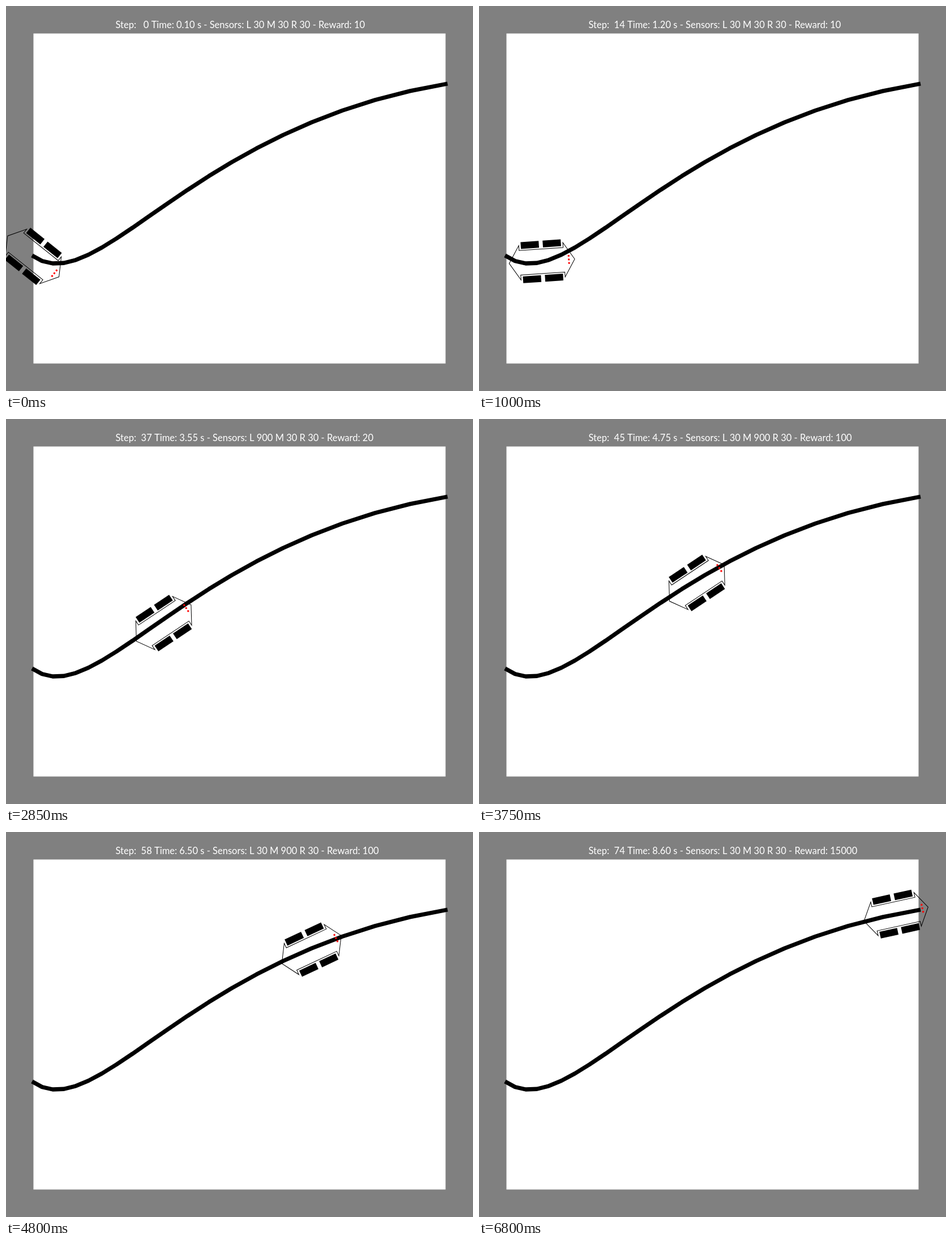
Recreate the animation shown at these times as an HTML page with a canvas. Size 825 by 679 pixels, loop 6950 ms.

```html
<!DOCTYPE html>
<html lang="en">
<head>
<meta charset="utf-8">
<title>Line follower</title>
<style>
  html, body { margin: 0; width: 100%; height: 100%; overflow: hidden; background: #808080; }
  canvas { display: block; }
</style>
</head>
<body>
<canvas id="stage" width="825" height="679"></canvas>
<script>
const ctx = document.getElementById('stage').getContext('2d');

const LOOP = 6950;      // ms
const TICK = 50;        // steps start on whole ticks
const FORWARD = 15.95;  // px per forward move
const TURN = 4.25;      // degrees per turn on the spot
const REACH = 47.6;     // sensor row ahead of the car centre
const GAP = 6.3;        // spacing of the sensors
const MARGIN = 48.5;
const WIDTH = 825, HEIGHT = 679;

// Each leg: turns (negative is left), then forward moves
const LEGS = [
  [-6, 1], [-1, 2], [-2, 1], [-3, 1], [-3, 3], [-3, 2], [2, 6],
  [-1, 10], [1, 3], [1, 8], [1, 3], [1, 4], [1, 4]
];

// Pace of the playback: step, ms
const PACE = [
  [0, 0], [1, 100], [14, 1000], [16, 1100], [17, 1250], [26, 2000], [28, 2300],
  [37, 2850], [41, 3450], [45, 3750], [54, 4400], [58, 4800], [64, 5500], [75, LOOP]
];

const clamp = (v, lo, hi) => Math.min(hi, Math.max(lo, v));

// The line is a cubic curve in 20 straight pieces
function bezier(t, a, b, c, d) {
  const s = 1 - t;
  return s * s * s * a + 3 * s * s * t * b + 3 * s * t * t * c + t * t * t * d;
}
const track = Array.from({ length: 21 }, (_, i) => [
  bezier(i / 20, 46, 162.3, 324.5, 780),
  bezier(i / 20, 440, 524.3, 211.2, 137)
]);

const side = [[58, 0], [39, 30.5], [39, 21.7], [-39, 21.7], [-39, 30.5]];
const body = [...side, ...side.map(([u, v]) => [-u, -v])];

function segmentDistance(x, y, [ax, ay], [bx, by]) {
  const dx = bx - ax, dy = by - ay;
  const t = clamp(((x - ax) * dx + (y - ay) * dy) / (dx * dx + dy * dy), 0, 1);
  return Math.hypot(x - ax - t * dx, y - ay - t * dy);
}

const offBoard = x => x > WIDTH - MARGIN;

// 30 on white, 900 on the line, a blend at its edge
function brightness([x, y]) {
  if (offBoard(x)) return 30;
  const gaps = track.slice(1).map((p, i) => segmentDistance(x, y, track[i], p));
  return Math.round(30 + 870 * clamp((4.8 - Math.min(...gaps)) / 2, 0, 1));
}

function rewardFor([l, m, r], finished) {
  if (finished) return 15000;
  if (m > 30) return 100;
  return l > 30 || r > 30 ? 20 : 10;
}

function makeStep(x, y, deg, time) {
  const a = deg * Math.PI / 180, c = Math.cos(a), s = Math.sin(a);
  const spots = [-GAP, 0, GAP].map(v => [x + REACH * c - v * s, y + REACH * s + v * c]);
  const sensors = spots.map(brightness);
  const finished = spots.every(([sx]) => offBoard(sx));
  return { x, y, a, time, sensors, reward: rewardFor(sensors, finished) };
}

function simulate() {
  let x = 48.2, y = 441.6, deg = 38.6, time = 0.1;
  const list = [makeStep(x, y, deg, time)];
  for (const [turns, moves] of LEGS) {
    for (let i = 0; i < Math.abs(turns); i++) {
      deg += TURN * Math.sign(turns);
      time += 0.05;
      list.push(makeStep(x, y, deg, time));
    }
    const a = deg * Math.PI / 180;
    for (let i = 0; i < moves; i++) {
      x += FORWARD * Math.cos(a);
      y += FORWARD * Math.sin(a);
      time += 0.15;
      list.push(makeStep(x, y, deg, time));
    }
  }
  return list;
}

function startOf(n) {
  const i = PACE.findIndex(([step]) => step > n);
  const [s0, t0] = PACE[i - 1], [s1, t1] = PACE[i];
  const t = t0 + (t1 - t0) * (n - s0) / (s1 - s0);
  return Math.round(t / TICK) * TICK;
}

const steps = simulate();
const starts = steps.map((_, n) => startOf(n));

function tracePath(points) {
  ctx.beginPath();
  points.forEach(([x, y]) => ctx.lineTo(x, y));
}

function drawBoard() {
  ctx.fillStyle = '#808080';
  ctx.fillRect(0, 0, WIDTH, HEIGHT);
  ctx.fillStyle = '#fff';
  ctx.fillRect(MARGIN, MARGIN, WIDTH - 2 * MARGIN, HEIGHT - 2 * MARGIN);
  tracePath(track);
  ctx.strokeStyle = '#000';
  ctx.lineWidth = 7.3;
  ctx.lineJoin = 'bevel';
  ctx.stroke();
}

function drawCar({ x, y, a }) {
  const box = (u, v, w, h) => ctx.fillRect(u - w / 2, v - h / 2, w, h);
  ctx.save();
  ctx.translate(x, y);
  ctx.rotate(a);
  tracePath(body);
  ctx.closePath();
  ctx.lineWidth = 1;
  ctx.lineJoin = 'miter';
  ctx.stroke();
  ctx.fillStyle = '#000';
  for (const u of [-19.5, 19.5]) {
    for (const v of [-30.3, 30.3]) box(u, v, 32, 12);
  }
  ctx.fillStyle = '#f00';
  for (const v of [-GAP, 0, GAP]) box(REACH, v, 3, 3);
  ctx.restore();
}

function drawStatus(n, { time, sensors: [l, m, r], reward }) {
  ctx.font = '16.55px Lato, sans-serif';
  ctx.fillStyle = '#fff';
  ctx.fillText(`Step: ${String(n).padStart(3)} Time: ${time.toFixed(2)} s - ` +
    `Sensors: L ${l} M ${m} R ${r} - Reward: ${reward}`, 193.5, 39);
}

const begin = performance.now();

function frame() {
  const t = (performance.now() - begin) % LOOP;
  let n = steps.length - 1;
  while (n > 0 && starts[n] > t) n--;
  drawBoard();
  drawCar(steps[n]);
  drawStatus(n, steps[n]);
  requestAnimationFrame(frame);
}
frame();
</script>
</body>
</html>
```
